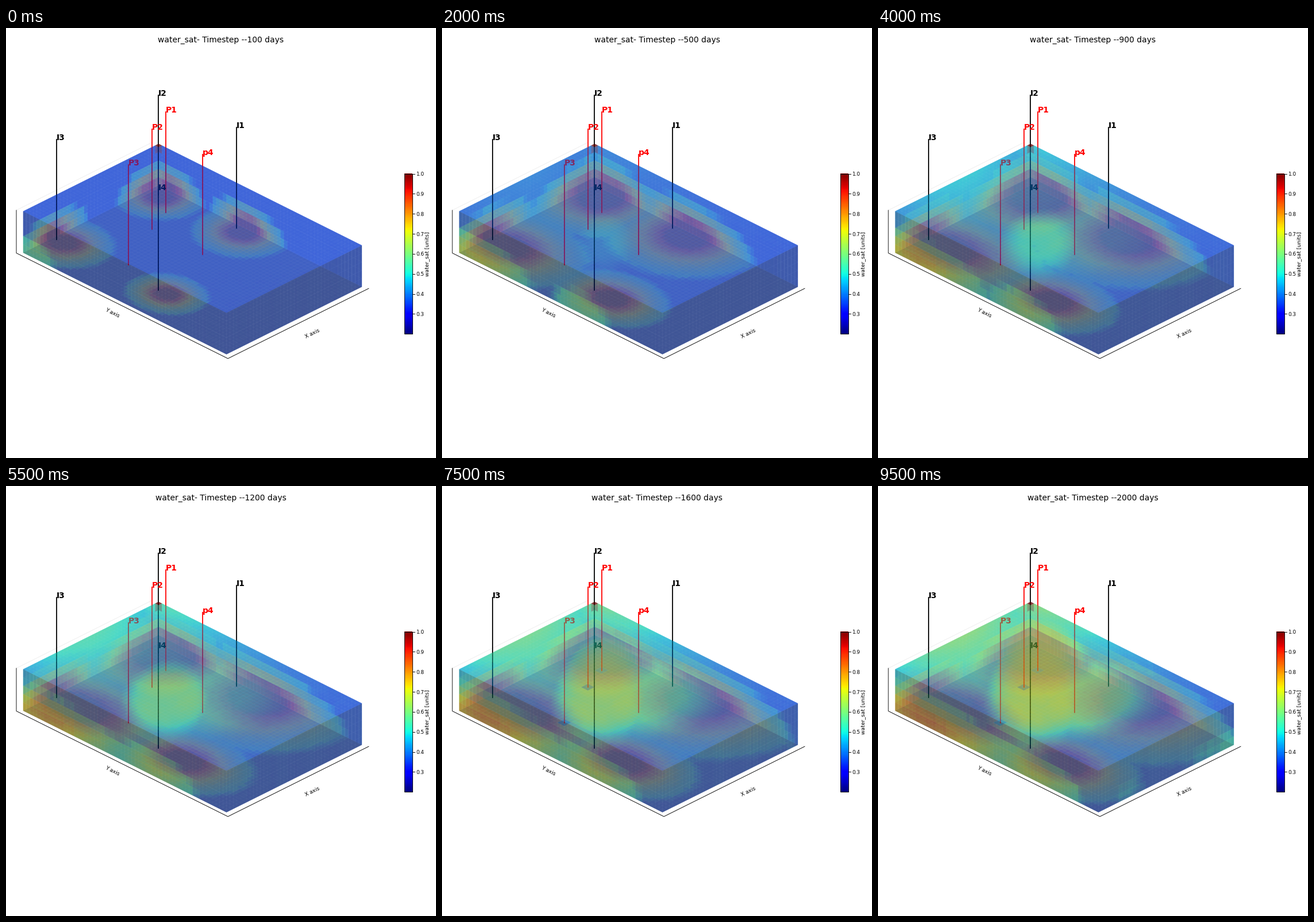
A matplotlib script that plays this animation: 748x748 px, repeating every 10 s.

```python
import numpy as np
import matplotlib.pyplot as plt
from matplotlib.animation import FuncAnimation
from matplotlib.collections import PolyCollection

SIZE, DPI, FRAMES = 748, 72, 20
NA, NB, NZ = 40, 60, 5
ORIGIN = np.array([265.4, 273.6])          # back corner of the box floor
EA, EB, EZ = np.array([[-5.89, 2.935], [5.895, 2.945], [0, -14.45]])
ALPHA = 0.5
JET = plt.get_cmap("jet")
JITTER = np.random.RandomState(3).rand(NA, NB) - 0.5

# a, b, radius and growth along a, radius and growth along b, drift along b
PLUMES = [
    (1.5, 24, 10, .30, 10.5, .31, 2.4),
    (3, 3, 9.3, .33, 9.3, .33, 0.8),
    (31, 1, 9.5, .22, 11, .35, 2.0),
    (31, 31, 7.6, .17, 9, .24, 2.4),
]
WELLS = [
    ("I1", 401, 173, 348, "black"), ("I2", 265, 117, 291, "black"),
    ("I3", 88, 194, 368, "black"), ("I4", 265, 281, 456, "black"),
    ("P1", 278, 146, 321, "red"), ("P2", 254, 176, 350, "red"),
    ("P3", 213, 238, 412, "red"), ("p4", 342, 220, 394, "red"),
]
PRODUCER_CELLS = [(7, 9), (14, 12), (28, 19)]


def saturation(ia, ib, iz, day):
    """Water saturation of the cells at the given indices."""
    n = day / 100
    a, b = ia + 0.5, ib + 0.5
    sat = np.full(np.shape(a), 0.35)

    depth = 2.5 * n ** 0.14
    for a0, b0, ra, ga, rb, gb, drift in PLUMES:
        da = (a - a0) / (ra * n ** ga)
        db = (b - b0 - drift * n ** 0.45) / (rb * n ** gb)
        d = np.sqrt(da ** 2 + db ** 2 + (iz / depth) ** 2)
        d = d + 0.04 * JITTER[ia, ib]
        inside = 0.5 + 0.5 * np.clip(1.35 * (1 - d), 0, 1) ** 1.4
        halo = 0.47 - (d - 1)
        sat = np.maximum(sat, np.where(d < 1, inside, halo))

    # slow rise along the back walls
    rise = (day / 900) ** 2 / (1 + (day / 900) ** 2)
    left = np.exp(-b / 18 - ((a - 20) / 24) ** 2)
    right = np.exp(-a / 13 - (b / 29) ** 1.5)
    strips = 0.33 * rise ** 1.3 * np.maximum(left, right)

    # dome under the top, stretching to the back corner, inside a wider cloud
    u = (a + b - 58) / 1.414
    v = (b - a - 3) / 1.414
    back = 1 + 20 * max(rise - 0.55, 0) ** 2
    ru = np.where(u < 0, back, 1) * max(9 + 6 * rise, 6)
    rv = max(3 + 7.8 * rise, 4)
    dome = 0.42 * rise ** 1.4 * np.exp(-0.7 * ((u / ru) ** 2 + (v / rv) ** 2) ** 2)
    spread = ((a - 22) / 16) ** 2 + ((b - 34) / 15) ** 2
    cloud = 0.40 * rise ** 3 * np.exp(-spread ** 2)
    top = np.maximum(dome, cloud) * (iz == NZ - 1)

    lift = np.maximum(strips, top) + 0.012 * rise * JITTER[ia, ib]
    sat = np.maximum(sat, 0.35 + lift)

    if day >= 1500:
        for ca, cb in PRODUCER_CELLS:
            sat = np.where((abs(a - ca) < 1) & (abs(b - cb) < 1) & (iz == 0), 0.22, sat)
    return np.where((ia == 0) & (ib == 0) & (iz == NZ - 1), 1.0, sat)


class Face:
    """One side of the box, split into cells; `fixed` is the constant axis."""

    def __init__(self, ax, fixed, far, shade, zorder):
        counts = [NA, NB, NZ]
        level = counts[fixed] if far else 0
        ranges = [np.arange(c) for c in counts]
        ranges[fixed] = np.array([level - 1 if far else 0])
        self.cells = [g.ravel() for g in np.meshgrid(*ranges, indexing="ij")]
        self.shade = shade

        base = np.stack(self.cells, axis=1).astype(float)
        base[:, fixed] = level
        p, q = [i for i in range(3) if i != fixed]
        corners = []
        for dp, dq in [(0, 0), (1, 0), (1, 1), (0, 1)]:
            c = base.copy()
            c[:, p] += dp
            c[:, q] += dq
            corners.append(ORIGIN + c @ np.array([EA, EB, EZ]))
        self.quads = PolyCollection(np.stack(corners, axis=1), edgecolors="none",
                                    linewidths=0, zorder=zorder)
        ax.add_collection(self.quads, autolim=False)

    def update(self, day):
        rgba = JET((saturation(*self.cells, day) - 0.2) / 0.8)
        rgba[:, :3] *= self.shade
        rgba[:, 3] = ALPHA
        self.quads.set_facecolor(rgba)


plt.rcParams["font.family"] = "DejaVu Sans"
fig = plt.figure(figsize=(SIZE / DPI, SIZE / DPI), dpi=DPI, facecolor="white")
ax = fig.add_axes([0, 0, 1, 1])
ax.axis("off")

# axis lines
ax.plot([18, 254], [317, 199], color="#eeeeee", lw=0.9, zorder=0)
ax.plot([18, 18, 386, 631], [317, 391.5, 575, 453], color="black", lw=0.9, zorder=0)
ax.text(185, 496, "Y axis", size=9, rotation=-26.5, ha="center", va="center")
ax.text(533, 531.5, "X axis", size=9, rotation=26.5, ha="center", va="center")
title = ax.text(374, 20.5, "", size=13.85, ha="center", va="center")

faces = [
    Face(ax, 2, False, 0.533, 1),   # floor
    Face(ax, 1, False, 0.883, 2),   # back left
    Face(ax, 0, False, 0.883, 2),   # back right
    Face(ax, 0, True, 0.417, 5),    # front left
    Face(ax, 1, True, 0.417, 5),    # front right
    Face(ax, 2, True, 0.767, 6),    # top
]

for name, x, top, bottom, color in WELLS:
    ax.plot([x, x], [top, bottom], color=color, lw=1.8, zorder=3)
    ax.text(x, top + 0.5, name, color=color, size=13.85, weight="bold",
            ha="left", va="baseline", zorder=4)

# colour bar
BAR = (693, 707, 532.3, 253.5)
ax.imshow(np.linspace(0, 1, 256)[:, None], cmap=JET, extent=BAR, origin="lower",
          aspect="auto", interpolation="nearest")
ax.set_xlim(0, SIZE)
ax.set_ylim(SIZE, 0)
ax.add_patch(plt.Rectangle((693, 253.5), 14, 278.8, fill=False, lw=0.9))
for tick in range(3, 11):
    y = 532.3 - (tick - 2) * 34.85
    ax.plot([707, 711], [y, y], color="black", lw=0.9)
    ax.text(713.5, y, f"{tick / 10:.1f}", size=8.9, ha="left", va="center_baseline")
ax.text(733, 393.5, "water_sat [units]", size=9.1, rotation=90, ha="center", va="center")


def draw(frame):
    day = 100 * (frame + 1)
    title.set_text(f"water_sat- Timestep --{day} days")
    for face in faces:
        face.update(day)
    return [title] + [face.quads for face in faces]


anim = FuncAnimation(fig, draw, frames=FRAMES, interval=500, repeat=True,
                     repeat_delay=0, init_func=lambda: draw(0))
plt.show()
```
